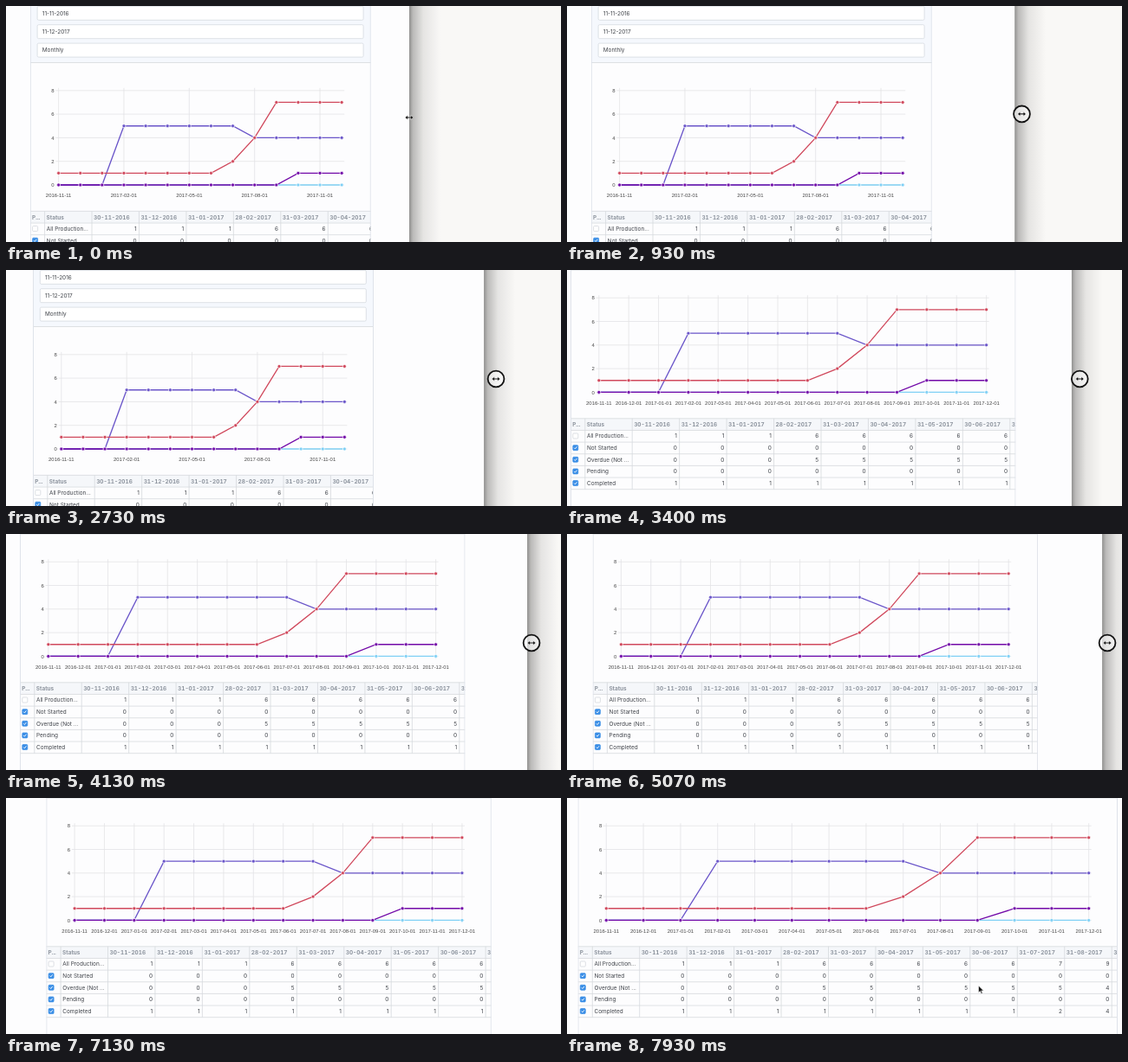
An HTML page that plays this animation: 640x273 px, repeating every 8000 ms.

```html
<!DOCTYPE html>
<html lang="en">
<head>
<meta charset="utf-8">
<title>Responsive report</title>
<style>
  html, body { margin: 0; width: 100%; height: 100%; overflow: hidden; background: #f9f8f6; }
  #stage { display: block; width: 100%; height: 100%; }
  text { font: 6.45px Inter, sans-serif; fill: #40444a; }
  .axis { font: 5.95px "Liberation Sans", sans-serif; fill: #444; }
  .head { font-weight: 700; font-variant-numeric: tabular-nums; fill: #8d949e; }
  .end { text-anchor: end; }
  .mid { text-anchor: middle; }
  .grid { stroke: #e4e4e6; stroke-width: .8; }
  .rule { stroke: #d6dade; stroke-width: .8; }
  .side { stroke: #dfe3ea; stroke-width: 1; }
</style>
</head>
<body>
<svg id="stage" viewBox="0 0 640 273">
  <defs>
    <linearGradient id="shade">
      <stop offset="0" stop-color="#000" stop-opacity=".42"/>
      <stop offset=".12" stop-color="#000" stop-opacity=".25"/>
      <stop offset=".45" stop-color="#000" stop-opacity=".08"/>
      <stop offset="1" stop-color="#000" stop-opacity="0"/>
    </linearGradient>
  </defs>
  <rect width="640" height="273" fill="#f9f8f6"/>
  <g id="edge">
    <rect width="36" height="273" fill="url(#shade)"/>
    <rect x="-700" width="700" height="273" fill="#fdfdfe"/>
  </g>
  <g id="pages"></g>
  <g id="resizer">
    <circle id="ring" r="9.4" fill="#fff" fill-opacity=".6" stroke="#111" stroke-width="1.8"/>
    <path d="M-4.8 0l3-2.6v1.8h3.6v-1.8l3 2.6-3 2.6v-1.8h-3.6v1.8z" fill="#111" stroke="#fff" stroke-width=".5"/>
  </g>
  <path id="pointer" d="M0 0v8.2l1.9-1.8 1.4 3 1.4-.6-1.4-2.9h2.6z" fill="#111" stroke="#fff" stroke-width=".6"/>
</svg>
<script>
const $ = id => document.getElementById(id);
const range = n => [...Array(n).keys()];
const pad = n => String(n).padStart(2, '0');

// Chart data: one value per month mark
const marks = ['2016-11-11', '2016-12-01', ...range(12).map(m => `2017-${pad(m + 1)}-01`)];
const steps = f => marks.map((_, i) => f(i));
const series = [
  ['#7fd0f5', steps(() => 0)],
  ['#6a55c9', steps(i => i < 3 ? 0 : i < 9 ? 5 : 4)],
  ['#d0485c', steps(i => i < 8 ? 1 : [2, 4][i - 8] ?? 7)],
  ['#7209a8', steps(i => i < 11 ? 0 : 1)],
];

// Table data: one column per month end
const monthEnds = range(11).map(i => {
  const d = new Date(Date.UTC(2016, 11 + i, 0));
  return `${pad(d.getUTCDate())}-${pad(d.getUTCMonth() + 1)}-${d.getUTCFullYear()}`;
});
const rows = [
  ['All Production...', false, [1, 1, 1, 6, 6, 6, 6, 6, 7, 9, 11]],
  ['Not Started', true, Array(11).fill(0)],
  ['Overdue (Not ...', true, [0, 0, 0, 5, 5, 5, 5, 5, 5, 4, 4]],
  ['Pending', true, Array(11).fill(0)],
  ['Completed', true, [1, 1, 1, 1, 1, 1, 1, 1, 2, 4, 7]],
];

const line = (x1, y1, x2, y2, cls) => `<line x1="${x1}" y1="${y1}" x2="${x2}" y2="${y2}" class="${cls}"/>`;
const rect = (x, y, w, h, attrs) => `<rect x="${x}" y="${y}" width="${w}" height="${h}" ${attrs}/>`;
const text = (x, y, s, cls = '') => `<text x="${x}" y="${y}" class="${cls}">${s}</text>`;

function form(width) {
  const values = ['11-11-2016', '11-12-2017', 'Monthly'];
  return rect(0, -5, width, 70.5, 'fill="#f5f8fd"') + line(0, 65.5, width, 65.5, 'rule') +
    values.map((s, i) => rect(8.3, .3 + 21.4 * i, width - 17, 16, 'rx="1.5" fill="#fff" stroke="#d5dae0" stroke-width=".8"') +
      text(14, 10.6 + 21.4 * i, s)).join('');
}

function chart(gap, every, base) {
  const px = i => 32.8 + gap * i, py = v => base - 13.65 * v;
  let out = '';
  for (let v = 0; v <= 8; v += 2)
    out += line(29.5, py(v), px(13) + 3, py(v), 'grid') + text(27.8, py(v) + 2.2, v, 'axis end');
  marks.forEach((s, i) => {
    if (i % every) return;
    out += line(px(i), py(8) - 3, px(i), base + 3, 'grid') + text(px(i), base + 14.2, s, 'axis mid');
  });
  for (const [color, values] of series) {
    const points = values.map((v, i) => `${px(i)},${py(v)}`).join(' ');
    out += `<polyline points="${points}" fill="none" stroke="${color}" stroke-width="1.3"/>` +
      values.map((v, i) => `<circle cx="${px(i)}" cy="${py(v)}" r="2" fill="${color}" stroke="#fff" stroke-width=".7"/>`).join('');
  }
  return out;
}

function checkbox(y, on) {
  return rect(2.8, y - 3, 6, 6, `rx="1" fill="${on ? '#3a8ee6' : '#fff'}" stroke="${on ? '#3a8ee6' : '#cfd3d8'}" stroke-width=".7"`) +
    (on ? `<path d="M4.2 ${y}l1.2 1.3 2-2.6" fill="none" stroke="#fff" stroke-width=".9"/>` : '');
}

function table(width, top) {
  const rowH = 13.65, colW = 54.45, first = 71.2, bottom = top + 6 * rowH;
  let out = rect(0, top, width, rowH, 'fill="#f5f7fa"') +
    text(2.2, top + 9.2, 'P...', 'head') + text(18.8, top + 9.2, 'Status', 'head');
  for (const i of range(7)) out += line(0, top + rowH * i, width, top + rowH * i, 'rule');
  out += line(16.8, top, 16.8, bottom, 'rule');
  monthEnds.forEach((s, i) => {
    const x = first + colW * i;
    out += line(x, top, x, bottom, 'rule') + text(x + 2, top + 9.2, s, 'head');
  });
  rows.forEach(([name, on, values], r) => {
    const y = top + rowH * (r + 1.5) - .3;
    out += checkbox(y, on) + text(19, y + 2.3, name) +
      values.map((v, i) => text(first + colW * (i + 1) - 2.8, y + 2.3, v, 'end')).join('');
  });
  return out;
}

function page({ width, gap, every, rise }) {
  return `<svg width="${width}" height="273" visibility="hidden">` +
    (rise ? line(0, 0, width, 0, 'rule') : form(width)) +
    chart(gap, every, 207 - rise) + table(width, 237.4 - rise) +
    line(.5, 0, .5, 273, 'side') + line(width - .5, 0, width - .5, 273, 'side') + '</svg>';
}

$('pages').innerHTML = [
  { width: 393, gap: 25.12, every: 3, rise: 0 },
  { width: 513.5, gap: 34.37, every: 1, rise: 65.6 },
  { width: 622.5, gap: 42.8, every: 1, rise: 65.6 },
].map(page).join('');
const pages = [...$('pages').children];

// The page reflows in jumps: [time, layout, left]
const reflows = [[0, 0, 27.8], [1000, 0, 31], [3070, 1, 4], [3670, 1, 16], [4730, 1, 29.6], [5600, 1, 46.3], [7270, 2, 12.5]];
const edgeKeys = [[0, 465], [130, 465], [870, 514], [1530, 537], [2730, 551], [3470, 585], [4130, 601], [5070, 617], [5500, 640], [5900, 690]];
const gripX = [[0, 465], [130, 466], [870, 523], [1530, 539], [2600, 556], [2730, 565], [3470, 594], [4130, 606], [4330, 613], [5070, 623], [5500, 646], [5900, 690]];
const gripY = [[0, 129], [870, 125], [1530, 124], [2730, 126]];
const pointerX = [[7330, 650], [7800, 474.5]], pointerY = [[7330, 190], [7800, 217]];

function at(keys, t) {
  const i = keys.findIndex(k => k[0] > t);
  if (i < 0) return keys.at(-1)[1];
  if (i === 0) return keys[0][1];
  const [t0, a] = keys[i - 1], [t1, b] = keys[i];
  return a + (b - a) * (t - t0) / (t1 - t0);
}
const move = (id, x, y) => $(id).setAttribute('transform', `translate(${x} ${y})`);

function draw(now) {
  const t = now % 8000;
  const [, layout, left] = reflows.findLast(r => r[0] <= t);
  pages.forEach((p, i) => p.setAttribute('visibility', i === layout ? 'visible' : 'hidden'));
  pages[layout].setAttribute('x', left);
  move('edge', at(edgeKeys, t), 0);
  move('resizer', at(gripX, t), at(gripY, t));
  $('ring').setAttribute('visibility', t < 130 ? 'hidden' : 'visible');
  move('pointer', at(pointerX, t), at(pointerY, t));
  requestAnimationFrame(() => draw(performance.now()));
}
draw(0);
</script>
</body>
</html>
```
